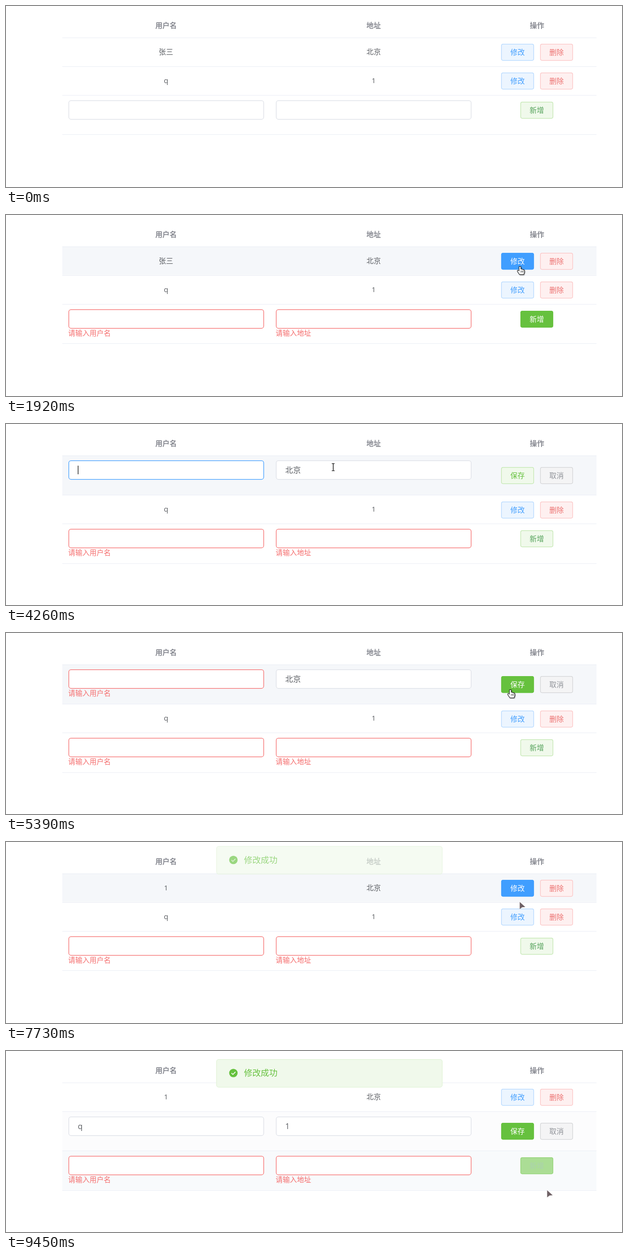
Write an HTML page with a canvas that moves like this. It is 1280x378 px and loops after 9.52 s.

```html
<!DOCTYPE html>
<html lang="zh-CN">
<head>
<meta charset="utf-8">
<style>
html, body { margin: 0; width: 100%; height: 100%; overflow: hidden; background: #fff; }
canvas { display: block; }
</style>
</head>
<body>
<canvas id="stage" width="1280" height="378"></canvas>
<script>
const ctx = document.getElementById('stage').getContext('2d');
const LOOP = 9520, STEP = 66.57, START = 130, LAG = 90;
const FAMILY = '"Open Sans", "Noto Sans CJK SC", "Noto Sans CJK", sans-serif';

const LEFT = 117, WIDTH = 1110, TOP = 65.5;
const PLAIN_H = 60.3, EDIT_H = 82.6;
const COLUMNS = { name: 332.5, addr: 764, ops: 1103.5 };
const INPUT_X = [130, 561], INPUT_W = 406, INPUT_H = 40;
const ACT_X = 1029, DROP_X = 1110, ADD_X = 1069, BTN_W = 68, BTN_H = 35;

const RED = '#f56c6c', GREEN = '#66c13e', BLUE = '#409eff', GREY = '#909399';
const TEXT = '#585b60', BORDER = '#dcdfe6';

const success = { bg: '#f0f9eb', border: '#c2e7b0', text: GREEN, solid: GREEN };
const STYLES = {
  success,
  add: { ...success, text: '#56a35c' },
  primary: { bg: '#ecf5ff', border: '#b3d8ff', text: BLUE, solid: BLUE },
  danger: { bg: '#fef0f0', border: '#fbc4c4', text: '#ec706f', solid: RED },
  info: { bg: '#f4f4f5', border: '#d3d4d6', text: GREY, solid: GREY }
};

const CLICKS = [
  { at: 330, on: 'add' },
  { at: 2130, on: 'act1' },
  { at: 2990, on: 'name' },
  { at: 5120, on: 'act1' },
  { at: 6350, on: 'name' },
  { at: 7420, on: 'act1' },
  { at: 8310, on: 'act2' }
];
const [ADD, EDIT, CLEAR, REJECT, RETYPE, SAVE, EDIT_NEXT] = CLICKS.map(c => c.at);

const smooth = u => u * u * (3 - 2 * u);
const accelerate = u => u ** 3;
const ENTRY = { x: 1219, y: 337 };
const MOVES = [
  { from: START, to: 400, x: 1106, y: 219 },
  { from: 730, to: 1660, x: 1068, y: 107 },
  { from: 2300, to: 2900, x: 326, y: 107 },
  { from: 4000, to: 4260, x: 680, y: 90 },
  { from: 4260, to: 4950, x: 1048, y: 118 },
  { from: REJECT + 540, to: 6250, x: 445, y: 93 },
  { from: 6680, to: 7310, x: 1068, y: 113 },
  { from: 7550, to: 8050, x: 1066, y: 159 },
  { from: 8920, to: 9450, x: 1124.5, y: 291, ease: accelerate }
];

const clamp = v => Math.max(0, Math.min(1, v));
const mix = (a, b, p) => a + (b - a) * p;
const within = (v, from, to) => v >= from && v < to;
const since = (t, at, ms) => clamp((t - at) / ms);

function blend(a, b, p) {
  const part = (hex, i) => parseInt(hex.slice(1 + i * 2, 3 + i * 2), 16);
  return `rgb(${[0, 1, 2].map(i => Math.round(mix(part(a, i), part(b, i), p)))})`;
}

// Interaction state, all derived from time

function pointerAt(t) {
  let { x, y } = ENTRY;
  for (const move of MOVES) {
    const p = (move.ease || smooth)(since(t, move.from, move.to - move.from));
    x = mix(x, move.x, p);
    y = mix(y, move.y, p);
  }
  return { x, y };
}

const lastClick = t => CLICKS.filter(c => c.at <= t).pop();
const focused = (id, t) => lastClick(t)?.on === id;

function layout(t) {
  const edit1 = within(t, EDIT + LAG, SAVE + LAG), edit2 = t >= EDIT_NEXT + LAG;
  const top2 = TOP + (edit1 ? EDIT_H : PLAIN_H);
  const top3 = top2 + (edit2 ? EDIT_H : PLAIN_H);
  return { edit1, edit2, tops: [TOP, top2, top3, top3 + 82.3] };
}

const buttonY = (top, editing) => Math.round(top + (editing ? 24.5 : 13.5));
const inputY = top => Math.round(top + 10.7);

function spots(t) {
  const { edit1, edit2, tops } = layout(t);
  const btn = (x, y) => ({ x, y, w: BTN_W, h: BTN_H, cursor: hand });
  const list = {};
  [edit1, edit2].forEach((editing, i) => {
    const y = buttonY(tops[i], editing);
    list['act' + (i + 1)] = btn(ACT_X, y);
    list['drop' + (i + 1)] = btn(DROP_X, y);
  });
  list.add = btn(ADD_X, Math.round(tops[2] + 13.9));
  [edit1, edit2, true].forEach((editing, i) => {
    if (editing) INPUT_X.forEach((x, col) => {
      list[`input${i}${col}`] = { x, y: inputY(tops[i]), w: INPUT_W, h: INPUT_H, cursor: beam };
    });
    list['row' + (i + 1)] = { x: LEFT, y: tops[i], w: WIDTH, h: tops[i + 1] - tops[i], cursor: arrow };
  });
  return list;
}

function over(spot, t) {
  const { x, y } = pointerAt(t);
  return t >= START && within(x, spot.x, spot.x + spot.w) && within(y, spot.y, spot.y + spot.h);
}

// A linear transition equals the recent average of an on/off state
function recent(state, t, ms) {
  const n = 12;
  let sum = 0;
  for (let i = 0; i < n; i++) sum += state(t - (i + 0.5) * ms / n);
  return sum / n;
}

const hover = (id, t) => recent(s => over(spots(s)[id], s), t, 220);
const solidity = (id, t) => recent(s => focused(id, s) || over(spots(s)[id], s), t, 100);

// Drawing helpers

function label(str, x, y, size, color, align = 'center', weight = 400) {
  ctx.font = `${weight} ${size}px ${FAMILY}`;
  ctx.textAlign = align;
  ctx.fillStyle = color;
  ctx.fillText(str, x, y);
}

function box(x, y, w, h, r, fill, border) {
  ctx.beginPath();
  ctx.roundRect(x + 0.5, y + 0.5, w - 1, h - 1, r);
  ctx.fillStyle = fill;
  ctx.fill();
  ctx.strokeStyle = border;
  ctx.lineWidth = 1.25;
  ctx.stroke();
}

function button(str, x, y, kind, solid = 0) {
  const s = STYLES[kind];
  box(x, y, BTN_W, BTN_H, 3.2, blend(s.bg, s.solid, solid), blend(s.border, s.solid, solid));
  label(str, x + BTN_W / 2, y + 23, 14.9, blend(s.text, '#ffffff', solid));
}

function input(col, top, value, border) {
  const x = INPUT_X[col], y = inputY(top);
  box(x, y, INPUT_W, INPUT_H, 4.5, '#fff', border);
  label(value, x + 19.3, y + 26, 16.1, TEXT, 'left');
}

function caret(value, top) {
  ctx.font = `16.1px ${FAMILY}`;
  ctx.fillStyle = '#333';
  ctx.fillRect(INPUT_X[0] + 19 + ctx.measureText(value).width, top + 21.5, 1.5, 18);
}

function warning(str, col, top, p) {
  if (!p) return;
  ctx.save();
  ctx.globalAlpha = p;
  ctx.translate(0, top + 51);
  ctx.scale(1, p);
  label(str, INPUT_X[col] - 0.7, 14.5, 14.75, RED, 'left');
  ctx.restore();
}

function band(top, bottom, p) {
  ctx.fillStyle = blend('#ffffff', '#f5f7fa', p);
  ctx.fillRect(LEFT, top, WIDTH, bottom - top);
}

function line(y) {
  ctx.fillStyle = '#ebeef5';
  ctx.fillRect(LEFT, Math.round(y), WIDTH, 1);
}

function polygon(points, fill, stroke, width) {
  ctx.beginPath();
  points.forEach(([x, y]) => ctx.lineTo(x, y));
  ctx.closePath();
  ctx.lineJoin = 'round';
  ctx.lineWidth = width;
  ctx.strokeStyle = stroke;
  ctx.fillStyle = fill;
  ctx.stroke();
  ctx.fill();
}

function arrow() {
  polygon([[0, 0], [11.5, 10.5], [5, 11], [0, 15]], '#6e6064', '#fff', 1);
}

function beam() {
  ctx.fillStyle = '#222';
  ctx.fillRect(-0.7, -7, 1.5, 14);
  [-8, 7].forEach(y => ctx.fillRect(-3, y, 6, 1.2));
}

function hand() {
  ctx.save();
  ctx.shadowColor = 'rgba(0,0,0,.35)';
  ctx.shadowBlur = 2;
  ctx.shadowOffsetX = ctx.shadowOffsetY = 1;
  polygon([[-1.4, 1], [1.4, 1], [1.4, 6], [6.4, 7.2], [8.6, 8.4], [9, 12], [7.4, 17],
    [-0.6, 17], [-5, 10.4], [-4.6, 8.8], [-1.4, 10.6]], '#fff', '#111', 2);
  ctx.restore();
  ctx.fillStyle = '#333';
  for (let i = 0; i < 3; i++) ctx.fillRect(1.6 + i * 2.4, 9, 0.9, 4);
}

function pointer(t) {
  if (t < START) return;
  const { x, y } = pointerAt(t);
  const spot = Object.values(spots(t)).find(s => over(s, t));
  ctx.save();
  ctx.translate(x, y);
  (spot ? spot.cursor : arrow)();
  const click = lastClick(t);
  if (click && t - click.at < 150) {
    ctx.beginPath();
    ctx.arc(0, 0, 15, 0, Math.PI * 2);
    ctx.fillStyle = 'rgba(245,235,0,.5)';
    ctx.fill();
  }
  ctx.restore();
}

function dataRow(t, index, name, addr, editing, border) {
  const { tops } = layout(t), top = tops[index], id = index + 1;
  const y = buttonY(top, editing), solid = solidity('act' + id, t);
  band(top, tops[id], hover('row' + id, t));
  if (editing) {
    input(0, top, name, border);
    input(1, top, addr, BORDER);
  } else {
    label(name, COLUMNS.name, top + 35, 14.9, TEXT);
    label(addr, COLUMNS.addr, top + 35, 14.9, TEXT);
  }
  button(editing ? '保存' : '修改', ACT_X, y, editing ? 'success' : 'primary', solid);
  button(editing ? '取消' : '删除', DROP_X, y, editing ? 'info' : 'danger');
}

function newRow(t, top, bottom) {
  const failed = since(t, ADD + 50, 150);
  band(top, bottom, hover('row3', t));
  ['请输入用户名', '请输入地址'].forEach((str, col) => {
    input(col, top, '', blend(BORDER, RED, failed));
    warning(str, col, top, failed);
  });
  button('新增', ADD_X, Math.round(top + 13.9), 'add', solidity('add', t));
}

function toast(t) {
  const p = since(t, SAVE + 110, 300);
  if (!p) return;
  ctx.save();
  ctx.globalAlpha = p;
  ctx.translate(0, -62 * (1 - p) ** 2);
  box(437, 17, 470, 59, 4.5, success.bg, '#e1f3d8');
  ctx.beginPath();
  ctx.arc(472.5, 46, 8.8, 0, Math.PI * 2);
  ctx.fillStyle = GREEN;
  ctx.fill();
  ctx.beginPath();
  ctx.moveTo(468.5, 46.2);
  ctx.lineTo(471.5, 49);
  ctx.lineTo(476.7, 43.6);
  ctx.strokeStyle = '#fff';
  ctx.lineWidth = 1.6;
  ctx.stroke();
  label('修改成功', 494.5, 52.4, 17.4, GREEN, 'left');
  ctx.restore();
}

function nameValue(t) {
  if (t >= RETYPE + 400) return '1';
  const erased = Math.max(0, Math.floor((t - CLEAR - 200) / 200));
  return '张三'.slice(0, Math.max(0, 2 - erased));
}

function draw(t) {
  const { edit1, edit2, tops } = layout(t);
  ctx.fillStyle = '#fff';
  ctx.fillRect(0, 0, 1280, 378);

  const heads = { name: '用户名', addr: '地址', ops: '操作' };
  for (const key in heads) label(heads[key], COLUMNS[key], 45.5, 14.9, '#888a92', 'center', 700);

  const name = nameValue(t), rejected = since(t, REJECT + 60, 200);
  const focus = recent(s => focused('name', s), t, 100);
  dataRow(t, 0, name, '北京', edit1, rejected ? blend(BORDER, RED, rejected) : blend(BORDER, BLUE, focus));
  if (edit1) {
    warning('请输入用户名', 0, TOP, rejected);
    if (focused('name', t) && (t - lastClick(t).at) % 1060 < 530) caret(name, TOP);
  }
  dataRow(t, 1, 'q', '1', edit2, BORDER);
  newRow(t, tops[2], tops[3]);
  tops.forEach(line);
  toast(t);
  pointer(t);
}

const sampled = t => t < START ? 0 : START + Math.floor((t - START) / STEP + 0.01) * STEP;

const begin = performance.now();
function tick() {
  draw(sampled((performance.now() - begin) % LOOP));
  requestAnimationFrame(tick);
}
tick();
</script>
</body>
</html>
```
